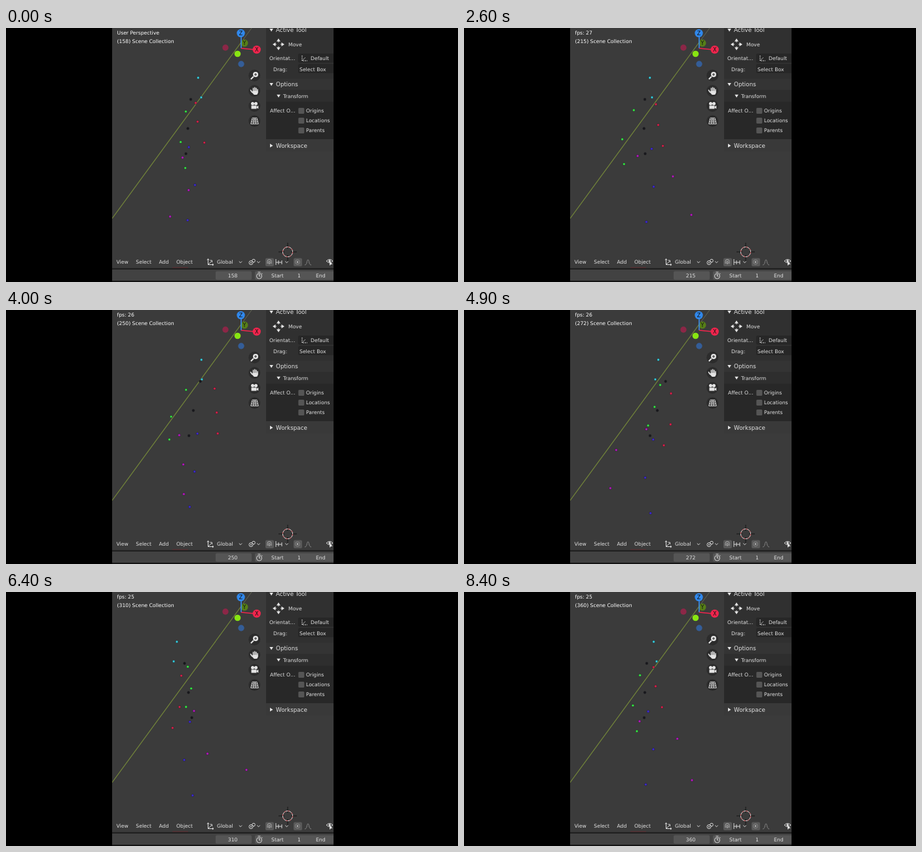
An HTML page that plays this animation: 690 px wide and 388 px high, repeating every 8.5 s.

```html
<!DOCTYPE html>
<html lang="en">
<head>
<meta charset="utf-8">
<title>Marker playback</title>
<style>
  html, body { margin: 0; width: 100%; height: 100%; overflow: hidden; background: #000; }
  svg { display: block; width: 100%; height: 100%; }
  text { font: 7.7px "DejaVu Sans", sans-serif; fill: #e2e2e2; }
  .title { font-size: 8.75px; }
  .view { fill: #fff; }
  .icon { fill: none; stroke: #d8d8d8; stroke-width: 1; }
  .solid { fill: #e4e4e4; stroke: none; }
  .letter { font-size: 8px; text-anchor: middle; fill: #111; }
</style>
</head>
<body>
<svg id="stage" viewBox="0 0 690 388">
  <defs><clipPath id="area"><rect x="162" width="338" height="388"/></clipPath></defs>
  <g clip-path="url(#area)">
    <rect x="162" width="338" height="388" fill="#3b3b3b"/>
    <path d="M162 291L360 20.500" stroke="#74873a" stroke-width="1.200"/>
    <path d="M360 20.500L375 0" stroke="#626652"/>
    <g id="dots" stroke="#202024" stroke-width=".5"></g>

    <!-- 3D cursor -->
    <g fill="none">
      <path d="M430 328v9m0 10v9M416 342h9m10 0h9" stroke="#151515"/>
      <circle cx="430" cy="342" r="7.600" stroke="#e6dcdc"/>
      <circle cx="430" cy="342" r="7.600" stroke="#c9474f" stroke-dasharray="2.980"/>
    </g>

    <!-- axis gizmo -->
    <g stroke-width="1.600">
      <circle cx="335" cy="30" r="4.700" fill="#8c2747"/>
      <circle cx="359" cy="55" r="4.700" fill="#345d98"/>
      <circle cx="364" cy="23" r="5.500" fill="#567f18"/>
      <path d="M359 31V13" stroke="#3b8ff0"/>
      <path d="M359 31l20 2" stroke="#f0254d"/>
      <circle cx="353.500" cy="39.500" r="4.800" fill="#88e512"/>
      <circle cx="358.500" cy="8" r="6.200" fill="#3088ec"/>
      <circle cx="382.700" cy="33" r="6.200" fill="#f0254d"/>
      <text class="letter" x="358.500" y="11">Z</text>
      <text class="letter" x="364" y="26">Y</text>
      <text class="letter" x="382.700" y="36">X</text>
    </g>

    <!-- view buttons -->
    <g fill="#2c2c2c">
      <circle cx="379.300" cy="72.500" r="9"/><circle cx="379.300" cy="96" r="9"/>
      <circle cx="379.300" cy="119" r="9"/><circle cx="379.300" cy="142" r="9"/>
    </g>
    <circle class="solid" cx="381" cy="71" r="4"/>
    <path d="M377.800 74.300l-4 4" stroke="#e4e4e4" stroke-width="2"/>
    <path d="M379 71h4m-2-2v4" stroke="#2c2c2c"/>
    <path d="M375.500 98l-2-3m4 2v-5m2.200 5v-6m2.200 6v-5m2.100 6v-4" stroke="#e4e4e4" stroke-width="1.600" stroke-linecap="round"/>
    <path class="solid" d="M375 97q5-2 9.800 0q0 5-3 5h-3q-2-1-3.800-5"/>
    <circle class="solid" cx="376.500" cy="115.500" r="2.500"/><circle class="solid" cx="381.500" cy="115.500" r="2.500"/>
    <path class="solid" d="M374.500 118.500h8v5h-8zM382.800 120l2.500-1.500v5l-2.500-1.500z"/>
    <path class="icon" d="M376 137.500h7l2.300 9h-11.600zM375 140.500h9m-9.700 3h10.500M378.500 137.500l-.8 9m2.800-9l.8 9"/>

    <!-- sidebar -->
    <rect x="397" width="103" height="170" fill="#303030"/>
    <rect x="397" y="77.500" width="103" height="17" fill="#343434"/>
    <rect x="397" y="95.500" width="103" height="74.500" fill="#282828"/>
    <rect x="397" y="95.500" width="103" height="17" fill="#2e2e2e"/>
    <rect x="397" y="171.500" width="103" height="17" fill="#393939"/>
    <rect x="446" y="39" width="60" height="14" rx="2" fill="#272727"/>
    <rect x="446" y="55" width="60" height="14" rx="2" fill="#272727"/>
    <g fill="#555">
      <rect x="446.300" y="122" width="9" height="9" rx="1.500"/>
      <rect x="446.300" y="137" width="9" height="9" rx="1.500"/>
      <rect x="446.300" y="152" width="9" height="9" rx="1.500"/>
    </g>
    <path class="solid" d="M402.300 1h5.600l-2.800 4.500zM402.300 84h5.600l-2.800 4.500zM413.300 101.700h5.600l-2.800 4.500zM403 176.800l4.500 2.900l-4.500 2.900z"/>
    <path class="icon" d="M416 18v4m0 6v4M409 25h4m6 0h4"/>
    <path class="solid" d="M413 20.500l3-4.500l3 4.500zM413 29.500l3 4.500l3-4.500zM411.500 22l-4.500 3l4.500 3zM420.500 22l4.500 3l-4.500 3z"/>
    <path class="icon" d="M452 42v8h8m-8 0l5-5" stroke-dasharray="2 1"/>

    <!-- header -->
    <path d="M254 366h24" stroke="#672a30"/>
    <rect x="396" y="351.500" width="13" height="12.500" rx="2" fill="#595959"/>
    <rect x="439" y="351.500" width="13" height="12.500" rx="2" fill="#595959"/>
    <g class="icon">
      <path d="M308.500 353v8.500h8m-8 0l5-5m-6.500-2l1.500-2l1.500 2m5 5.500l2 1.500l-2 1.500m-3.500-8h3v3"/>
      <circle cx="374" cy="358.500" r="3"/><circle cx="378" cy="355.500" r="2.300"/>
      <path d="M399 360v-3.500a3 3 0 0 1 6 0v3.500m-2 0v-3a1 1 0 0 0-2 0v3z" stroke="#aaa"/>
      <path d="M412 353v9m0-4h9m-5-3v6m5-6v6"/>
      <circle cx="445" cy="357.500" r="3.400" stroke="#858585"/>
      <path d="M456 362c4 0 3-8 5-8s1 8 5 8" stroke="#858585"/>
      <path d="M355.800 356.500l2.200 2.200l2.200-2.200M383.300 356.500l2.200 2.200l2.200-2.200M426.300 356.500l2.200 2.200l2.200-2.200"/>
      <path d="M489 356q5-5 10 0q-5 5-10 0"/>
    </g>
    <circle class="solid" cx="494" cy="356" r="1.700"/>
    <path class="solid" d="M494 356v7l2-2l2.500 0z"/>
    <circle class="solid" cx="374" cy="358.500" r="1"/>
    <circle cx="445" cy="357.500" r="1.200" fill="#bbb"/>

    <!-- timeline -->
    <rect x="162" y="366.800" width="338" height="2.200" fill="#202020"/>
    <rect x="162" y="369" width="338" height="17" fill="#424242"/>
    <rect x="162" y="386" width="338" height="2" fill="#151515"/>
    <rect x="320" y="371.500" width="55" height="13" rx="2" fill="#555"/>
    <rect x="380" y="371.500" width="128" height="13" rx="2" fill="#555"/>
    <g class="icon"><circle cx="386.500" cy="379" r="4"/><path d="M386.500 376v3h2M384.500 373h4m1.500 1.500l1.500 1.500"/></g>
    <g id="labels"></g>
  </g>
</svg>
<script>
const LOOP = 8500, STEP = 100, START = 320;
const dots = document.getElementById('dots');
const labels = document.getElementById('labels');

function add(parent, tag, attrs) {
  const el = document.createElementNS('http://www.w3.org/2000/svg', tag);
  for (const key in attrs) el.setAttribute(key, attrs[key]);
  return parent.appendChild(el);
}

function label(x, y, str, cls = '') {
  const el = add(labels, 'text', { x, y, class: cls });
  el.textContent = str;
  return el;
}

label(412, 6, 'Active Tool', 'title');
label(412, 89.2, 'Options', 'title');
label(412, 183, 'Workspace', 'title');
label(431, 28, 'Move');
label(402, 49.3, 'Orientat…');
label(465, 49.3, 'Default');
label(408, 65.7, 'Drag:');
label(448, 65.7, 'Select Box');
label(423, 106.8, 'Transform');
label(403, 129, 'Affect O…');
['Origins', 'Locations', 'Parents'].forEach((s, i) => label(458, 129.2 + i * 15, s));
[[168.5, 'View'], [198.3, 'Select'], [233.5, 'Add'], [260, 'Object'], [322, 'Global']]
  .forEach(([x, s]) => label(x, 360.3, s));
[[405, 'Start'], [445, '1'], [473, 'End']].forEach(([x, s]) => label(x, 381, s));
const status = label(169.5, 9.5, '', 'view');
const collection = label(169.5, 23.3, '', 'view');
const counter = label(338.8, 381, '');

// Key poses: body yaw in degrees, neck x, and reach of the swinging foot.
const times = [START, 1400, 2600, 4000, 4900, 6400, 8400];
const yawKeys = [-70, -57, -40, -8, 68, 103, -62];
const neckKeys = [298, 308, 287, 299, 292, 256, 294];
const swingKeys = [-19, -45, 82, 7, -55, 80, 80];
const rateKeys = [26, 26, 27, 26, 26, 25, 25];

// Cubic Hermite curve through the values at the key times.
function curve(v, t) {
  const last = times.length - 1;
  if (t <= times[0]) return v[0];
  if (t >= times[last]) return v[last];
  let i = 0;
  while (t > times[i + 1]) i++;
  const slope = k => {
    const a = Math.max(k - 1, 0), b = Math.min(k + 1, last);
    return (v[b] - v[a]) / (times[b] - times[a]);
  };
  const h = times[i + 1] - times[i], s = (t - times[i]) / h;
  const ease = s * s * (3 - 2 * s);
  return v[i] + (v[i + 1] - v[i]) * ease
    + h * s * (1 - s) * ((1 - s) * slope(i) - s * slope(i + 1));
}

// A figure that turns over one planted foot while the other leg swings.
function pose(t) {
  const yaw = curve(yawKeys, t) * Math.PI / 180;
  const c = Math.cos(yaw), s = Math.sin(yaw);
  const swing = curve(swingKeys, t);
  const reach = (p, out, ahead, drop, depth = 0) =>
    [p[0] + out * c - ahead * s, p[1] + drop + depth * s];
  const mid = (a, b) => [(a[0] + b[0]) / 2, (a[1] + b[1]) / 2];

  const neck = [curve(neckKeys, t), 106];
  const head = reach(neck, 0, -5, -30);
  const hips = [279 + 5 * s, 190];

  const shoulderR = reach(neck, 22, -17, 15, 7);
  const elbowR = reach(shoulderR, 3, 2, 38, 10);
  const wristR = reach(elbowR, 0, 11, 32);
  const shoulderL = reach(neck, -22, -17, 15, -7);
  const elbowL = reach(shoulderL, -23, 0, 40, -7);
  const wristL = reach(elbowL, -4, 9, 34, -6);

  const hipR = reach(hips, 14, 0, 0, 8.5);
  const ankleR = reach([281, 302], 0, -4, 0, 9);
  const kneeR = reach(mid(hipR, ankleR), 0, 11, 2);
  const hipL = reach(hips, -14, 0, 0, -8.5);
  const ankleL = [hipL[0] + swing, hipL[1] + 90];
  const kneeL = reach(mid(hipL, ankleL), 0, 20, 0, 0.26 * swing);

  const chest = reach(mid(shoulderR, shoulderL), 0, 0, -12);
  const pelvis = reach(hips, 1, 0, 2);
  const spine = reach(mid(chest, pelvis), -2, 0, 3);

  return {
    '#35cfdf': [head, neck],
    '#d9204a': [shoulderR, elbowR, wristR],
    '#35e843': [shoulderL, elbowL, wristL],
    '#3d29d2': [hipR, kneeR, ankleR],
    '#b518be': [hipL, kneeL, ankleL],
    '#17171b': [chest, spine, pelvis]
  };
}

const circles = {};
for (const [color, points] of Object.entries(pose(0)))
  circles[color] = points.map(() => add(dots, 'circle', { r: 1.9, fill: color }));

function draw(t) {
  const n = Math.max(158, Math.floor(150 + t / 40));
  status.textContent = t < START ? 'User Perspective' : 'fps: ' + Math.round(curve(rateKeys, t));
  collection.textContent = `(${n}) Scene Collection`;
  counter.textContent = n;
  for (const [color, points] of Object.entries(pose(t)))
    points.forEach(([x, y], i) => {
      circles[color][i].setAttribute('cx', x.toFixed(2));
      circles[color][i].setAttribute('cy', y.toFixed(2));
    });
}

const origin = performance.now();
function tick() {
  const t = (performance.now() - origin) % LOOP;
  draw(Math.floor(t / STEP) * STEP);
  requestAnimationFrame(tick);
}
tick();
</script>
</body>
</html>
```
